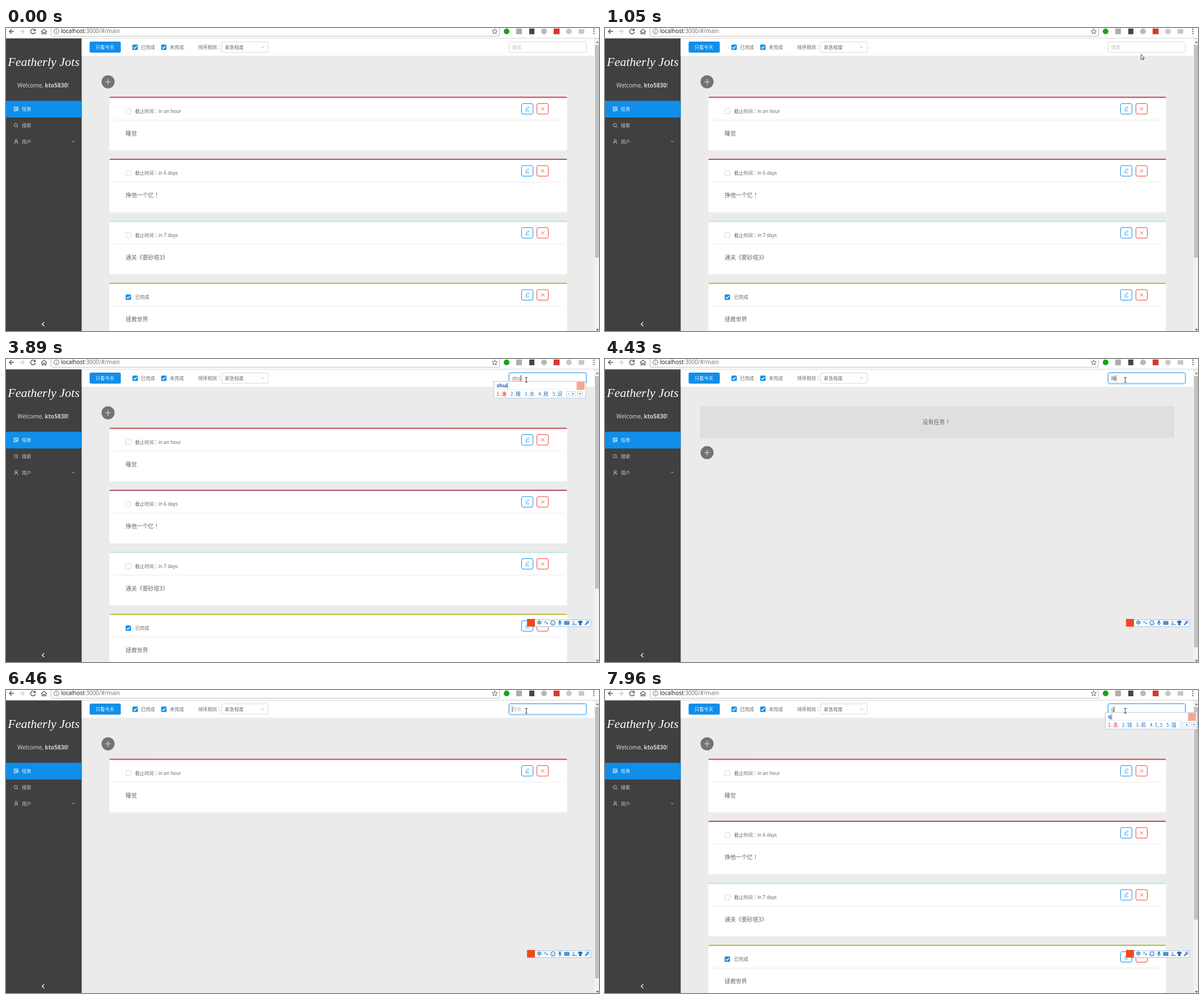
These frames come from a looping animation (1046 by 535 pixels, 8 s). An HTML page:

```html
<!DOCTYPE html>
<html lang="zh-CN">
<head>
<meta charset="utf-8">
<title>Todo</title>
<style>
html, body { margin: 0; width: 100%; height: 100%; overflow: hidden; background: #ebebeb; }
svg { display: block; font-family: 'Noto Sans', 'Noto Sans CJK SC', 'Noto Sans CJK', sans-serif; }
text { white-space: pre; }
.script { font-family: 'Liberation Serif', serif; font-style: italic; }
.mono { font-family: 'Noto Sans Mono CJK SC', 'Liberation Mono', 'Noto Sans CJK SC', monospace; }
.centred { font-family: 'Noto Sans CJK TC', 'Noto Sans CJK SC', sans-serif; }
</style>
</head>
<body>
<svg id="stage" width="1046" height="535" viewBox="0 0 1046 535"></svg>
<script>
const LOOP = 8000, BLUE = '#108ee9', RED = '#f04134', IME_BLUE = '#1a6fc4', PITCH = 109.5;

const rect = (x, y, w, h, fill, extra = '') =>
  `<rect x="${x}" y="${y}" width="${w}" height="${h}" fill="${fill}" ${extra}/>`;
const box = (x, y, w, h, stroke, r = 2.5, fill = '#fff') =>
  rect(x, y, w, h, fill, `rx="${r}" stroke="${stroke}"`);
const circle = (x, y, r, fill, extra = '') =>
  `<circle cx="${x}" cy="${y}" r="${r}" fill="${fill}" ${extra}/>`;
const line = (d, stroke, width = 1, extra = '') =>
  `<path d="${d}" fill="none" stroke="${stroke}" stroke-width="${width}" ${extra}/>`;
const shape = (d, fill) => `<path d="${d}" fill="${fill}"/>`;

// Full-width punctuation sits in the middle of its cell.
const centrePunctuation = str =>
  str.replace(/[：！]/g, '<tspan class="centred" lang="zh-TW">$&</tspan>');
const text = (x, y, str, fill, size = 8.25, extra = '') =>
  `<text x="${x}" y="${y}" fill="${fill}" font-size="${size}" ${extra}>${centrePunctuation(str)}</text>`;

function checkbox(x, y, checked) {
  return checked
    ? rect(x, y, 9.5, 9.5, BLUE, 'rx="1.5"') + line(`M${x + 2} ${y + 4.7}l2 2.2 3.6-4.2`, '#fff', 1.4)
    : box(x + .5, y + .5, 9, 9, '#d9d9d9', 1.5);
}

function browserBar() {
  const dark = '#555', pale = '#b8b8b8';
  return rect(0, 0, 1046, 18, '#fff') + rect(0, 17.6, 1046, .9, '#c4c4c4') +
    line('M79.5 0V12.5q0 2 2 2H868.5q2 0 2-2V0', '#bbb') +
    line('M14 6H6M10 2L6 6l4 4', dark, 1.4) +
    line('M24 6h8M28 2l4 4-4 4', '#ccc', 1.4) +
    line('M51 3.5A4.2 4.2 0 1 0 51.8 7', dark, 1.4) + shape('M52.2 .8v4.4h-4.4z', dark) +
    line('M62 6.5L67 2l5 4.5M63.5 6v4.5h2.4V7.5h2.2v3h2.4V6', dark, 1.2) +
    circle(89, 6, 4.3, 'none', 'stroke="#666"') + line('M89 5.5v3M89 3.3v1', '#666') +
    text(97, 9.4, 'localhost<tspan fill="#777">:3000/#/main</tspan>', '#222', 9.9) +
    line('M862 1.5l1.3 3 3.3.3-2.5 2.2.8 3.3-2.9-1.8-2.9 1.8.8-3.3-2.5-2.2 3.3-.3z', '#666') +
    circle(883, 6, 5, '#17a21d') + rect(900, 1, 10, 10, '#adadad') +
    rect(923, 1, 9, 10, '#4d4540') + circle(949, 6, 5, pale) +
    rect(966, 1, 10.5, 10, '#d7382f') + circle(993, 6, 5, '#c8c8c8') + rect(1010, 2, 10, 8, '#c8c8c8') +
    [2.2, 6, 9.8].map(y => circle(1037, y, 1.1, dark)).join('');
}

function sidebar() {
  const pale = '#c6c6c6';
  return rect(0, 18.5, 133.5, 516.5, '#404040') +
    text(66.5, 67, 'Featherly Jots', '#fff', 22, 'class="script" text-anchor="middle"') +
    text(65.5, 105, 'Welcome, <tspan font-weight="bold">kto5830</tspan>!', '#d2d2d2', 10, 'text-anchor="middle"') +
    rect(0, 128.5, 133.5, 29.5, BLUE) +
    line('M21 143v-3.5h-6.5v7H18M16 142h3M16 144h2M19 143.5l2.5 3M19 146.5v-3h3', '#fff') +
    text(28, 146.3, '任务', '#fff') +
    circle(17.3, 171.5, 2.9, 'none', `stroke="${pale}"`) + line('M19.4 173.6l2 2', pale) +
    text(28, 175.3, '搜索', pale) +
    circle(18, 198.8, 2, 'none', `stroke="${pale}"`) + line('M15.2 204.5q0-3.5 2.8-3.5t2.8 3.5', pale) +
    text(28, 203.8, '用户', pale) +
    line('M116.5 199.2l2.2 2.2 2.2-2.2', pale) + line('M67.5 519.5l-3.8 3.5 3.8 3.5', '#fff', 1.2);
}

function header() {
  const ink = '#666';
  return rect(133.5, 18.5, 904, 30.5, '#fff') +
    rect(147.5, 24, 55, 19.5, BLUE, 'rx="2.5"') + text(158, 36.8, '只看今天', '#fff') +
    checkbox(223, 29.3, true) + text(238, 36.8, '已完成', ink) +
    checkbox(273.7, 29.3, true) + text(289, 36.8, '未完成', ink) +
    text(339, 36.8, '排序规则：', ink) +
    box(380.5, 24.5, 82, 18.5, '#d9d9d9') + text(386, 36.8, '紧急程度', ink) +
    line('M450.3 32.8l2.2 2.2 2.2-2.2', '#aaa');
}

const cards = [
  ['#d35067', '截止时间：in an hour', '睡觉'],
  ['#b4586f', '截止时间：in 6 days', '挣他一个亿！'],
  ['#b5ead7', '截止时间：in 7 days', '通关《雾砂塔3》'],
  ['#b9c352', '已完成', '拯救世界', true],
];

function card([color, due, title, done], i) {
  return `<g transform="translate(0 ${i * PITCH})">` +
    rect(182.3, 121.5, 807.4, 94.5, '#fff', 'rx="3"') +
    shape('M182.3 123.5q0-2.2 3-2.2H986.7q3 0 3 2.2z', color) +
    checkbox(211, 142, done) + text(227.7, 149.6, due, '#666') +
    rect(189, 162, 794, .9, '#e9e9e9') + text(211, 189.8, title, '#666', 9.9) +
    box(909.5, 133.5, 20, 18.5, BLUE) + box(936.5, 133.5, 20, 18.5, RED) +
    line('M917 144.2l.5-1.9 3.6-3.6 1.5 1.5-3.6 3.6zM916 146.3h7', BLUE, .8) +
    line('M944.2 140.3l5 5M949.2 140.3l-5 5', RED, .9) + '</g>';
}

function addButton(y) {
  return circle(180, y, 11.5, '#737373') + line(`M175 ${y}h10M180 ${y - 5}v10`, '#e2e2e2', 1.1);
}

function scrollbar(bottom) {
  return rect(1037.5, 18.5, 8.5, 516.5, '#f1f1f1') + rect(1039, 30, 7, bottom - 30, '#c1c1c1') +
    shape('M1040.5 26.5l2.7-3 2.7 3z', '#777') + shape('M1040.5 531.5l2.7 3 2.7-3z', '#555');
}

function searchBox({ value, composing, caret, focus }) {
  const width = composing ? value.length * 3.9 : value.length * 8.25;
  const end = 892.8 + (value === 'q' ? 5 : width);
  return (focus > 1 ? box(886.5, 23.5, 138, 21, '#b4dcf8', 3.5, 'none') : '') +
    box(887.5, 24.5, 136, 18.5, focus ? '#49a9ee' : '#d9d9d9') +
    text(892.7, 36.8, value || '搜索', value ? '#666' : '#bfbfbf') +
    (composing ? line(`M893 38.6H${end}`, RED, .8, 'stroke-dasharray="1 1"') : '') +
    (caret ? rect(end - .3, 28.5, .9, 11, '#444') : '');
}

function imeBar() {
  return box(930.5, 460.5, 101, 12, '#a9c4dd', 0) + rect(919, 459, 14, 13.5, '#ee4a22') +
    text(936.5, 469.4, '中', IME_BLUE, 8.6, 'font-weight="bold"') +
    circle(951, 464.3, 1.3, 'none', `stroke="${IME_BLUE}" stroke-width=".8"`) + shape('M953.5 465.5h2v2l-1.5 1.5z', IME_BLUE) +
    circle(964.7, 466, 4, 'none', `stroke="${IME_BLUE}"`) +
    line('M963 464v1.2M966.4 464v1.2M962.5 467q2.2 2.4 4.4 0', IME_BLUE, .9) +
    rect(975.5, 461.5, 3, 5.5, IME_BLUE, 'rx="1.5"') + line('M974 465.5q0 3 3 3t3-3M977 468.5v2', IME_BLUE, .9) +
    rect(984.7, 462.8, 9, 6.4, IME_BLUE) + line('M986 464.8h6.5M986 467h6.5', '#fff', .9, 'stroke-dasharray="1.2 .6"') +
    circle(1001, 464, 1.8, '#9bb5cc') + shape('M998 470q0-4 3-4t3 2h3v2z', '#9bb5cc') +
    shape('M1011 462h4l2.5 2-1.2 2-1.3-.8v4.8h-4v-4.8l-1.3.8-1.2-2z', IME_BLUE) +
    line('M1021.5 469.5l4-4', IME_BLUE, 1.8) + circle(1026.3, 464.6, 1.8, 'none', `stroke="${IME_BLUE}" stroke-width="1.3"`);
}

function imePopup(left, typed, words) {
  let x = left + 5;
  const candidates = words.map((word, i) => {
    const item = text(x, 65, `${i + 1}.${word}`, i ? '#1878c8' : '#e02020', 8.8, 'class="mono"');
    x += word.length > 1 ? 29 : 24.6;
    return item;
  }).join('');
  const caretX = left + (typed === 'q' ? 11 : 5 + typed.length * 4.7);
  return box(left, 39.5, 162, 29.5, '#b5cbe0', 0) + rect(left, 53.3, 162, .8, '#dfe7ef') +
    text(left + 5, 50, typed, '#1060c0', 9, 'font-weight="bold"') + rect(caretX, 42, .9, 10, RED) +
    candidates + box(x, 57.5, 15.5, 8, '#c3d5e6', 0) + box(x + 20, 57.5, 8, 8, '#c3d5e6', 0) +
    shape(`M${x + 4.5} 60v3l-2-1.5z`, '#aaa') + shape(`M${x + 10.5} 59.5v4l2.5-2z`, IME_BLUE) +
    shape(`M${x + 22} 60.5h4l-2 2.2z`, IME_BLUE) + rect(left + 146, 40.5, 14, 14, '#f3a78f');
}

// Pointer stops: time, x, y.
const pointerPath = [
  [310, 968, 518], [420, 964, 410], [530, 959, 301], [680, 956, 240],
  [760, 953, 170], [830, 950, 105], [910, 947, 61], [1050, 945, 46],
];

function pointer(t) {
  if (t < 310) return '';
  if (t >= 1260) {
    const x = t < 1370 ? 932 : t < 1470 ? 922 : 917.7;
    return line(`M${x - 2} 32.5h4M${x} 32.5v8.5M${x - 2} 41h4`, '#222', .9);
  }
  const [, x, y] = pointerPath.filter(stop => stop[0] <= t).pop();
  return `<path d="M${x + .5} ${y + .5}v8.8l2-1.8 1.4 3 1.4-.7-1.4-2.8h2.8z" fill="#fff" stroke="#222" stroke-width=".8"/>`;
}

// Times at which the text caret switches on or off.
const caretFlips = [1660, 2270, 2820, 3270, 3660, 4960, 5510, 6020, 6460, 7000, 7590];

// Typing steps: time, value, popup left edge, candidates.
const typing = [
  [0, ''],
  [3660, 's', 886.5, '是 说 上 时 事'],
  [3810, 'shu', 873.5, '书 树 数 输 属'],
  [3890, 'shui', 860.5, '谁 睡 水 税 说'],
  [4430, '睡'],
  [6460, ''],
  [7960, 'q', 882.5, '去 钱 前 $_$ 强'],
];

function scene(t) {
  const [, value, left, words] = typing.filter(step => step[0] <= t).pop();
  const empty = t >= 4430 && t < 4960;
  const filtered = t >= 4430 && t < 7000;
  const shown = empty ? [] : filtered ? cards.slice(0, 1) : cards;
  return rect(0, 0, 1046, 535, '#ebebeb') +
    (empty ? rect(168, 83, 836, 56.5, '#dfdfdf', 'rx="3"') + text(560, 115.3, '没有任务！', '#666', 9.9) : '') +
    addButton(empty ? 165.3 : 95) + shown.map(card).join('') +
    scrollbar(filtered ? 509 : 405.5) + browserBar() + sidebar() + header() +
    searchBox({
      value, composing: !!words,
      caret: caretFlips.filter(time => time <= t).length % 2,
      focus: t < 1470 ? 0 : t < 1880 ? 1 : 2,
    }) +
    (t >= 1660 ? imeBar() : '') + (words ? imePopup(left, value, words.split(' ')) : '') + pointer(t);
}

const stage = document.getElementById('stage');
let current = '';
function tick() {
  const next = scene(performance.now() % LOOP);
  if (next !== current) stage.innerHTML = current = next;
  requestAnimationFrame(tick);
}
tick();
</script>
</body>
</html>
```
